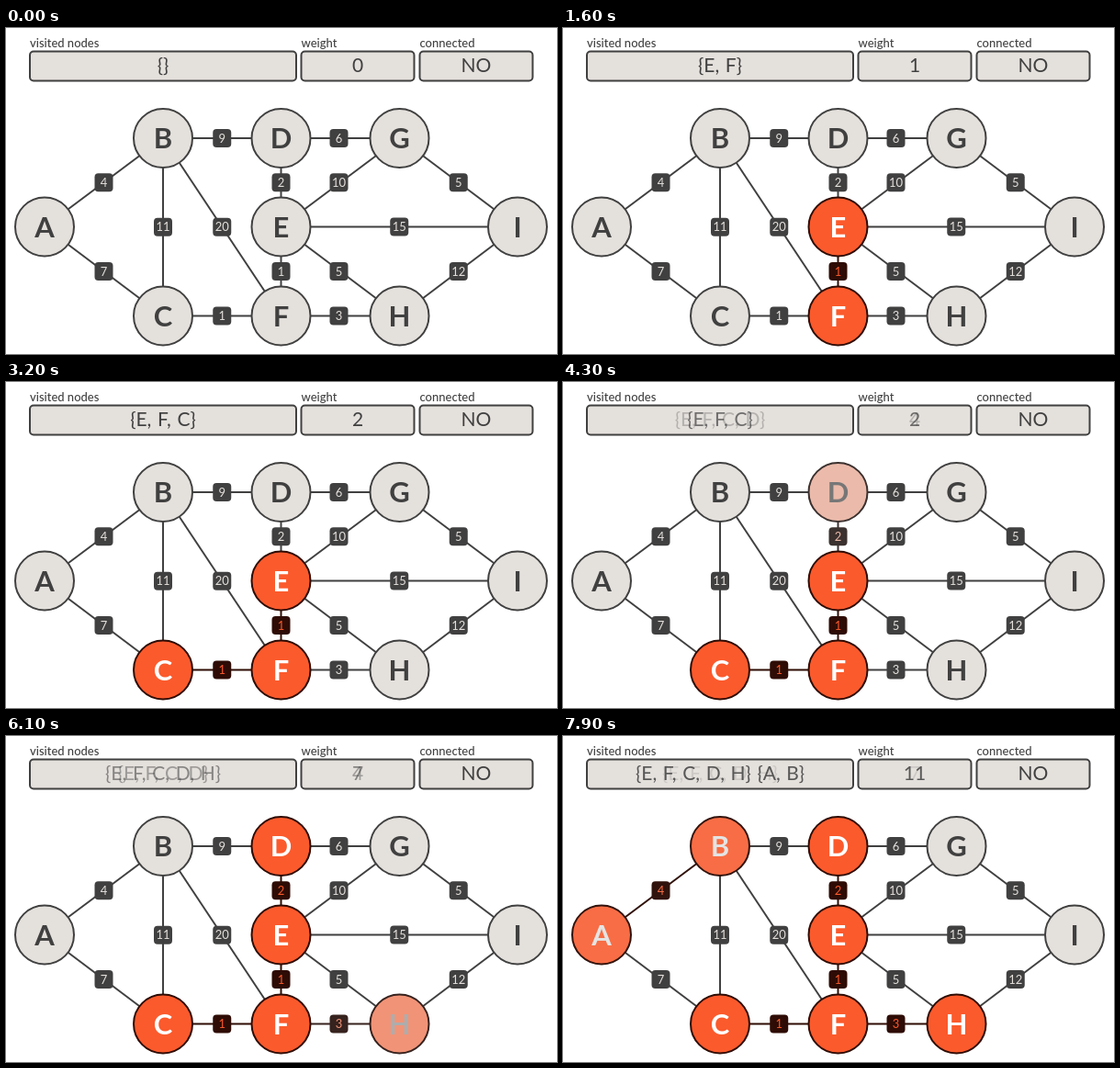
These frames come from a looping animation (600 px wide and 355 px high, 8000 ms). An HTML page with a canvas:

```html
<!DOCTYPE html>
<html lang="en">
<head>
<meta charset="utf-8">
<title>Minimum spanning tree</title>
<style>
  html, body { margin: 0; height: 100%; overflow: hidden; background: #fff; }
  canvas { display: block; }
</style>
</head>
<body>
<canvas id="stage" width="600" height="355"></canvas>
<script>
const ctx = document.getElementById('stage').getContext('2d');
const LOOP = 8000, FIRST = 1000, INTERVAL = 1600, TICK = 100, TICKS = 7;
const DARK = [64, 64, 64], PALE = [228, 224, 220], WHITE = [255, 255, 255];
const ORANGE = [251, 90, 44], BURNT = [46, 12, 5];

const nodes = {
  A: [42, 216.5], B: [171, 120], C: [171, 313.5],
  D: [299.5, 120], E: [299.5, 216.5], F: [299.5, 313.5],
  G: [428.5, 120], H: [428.5, 313.5], I: [557, 216.5]
};

// End nodes, weight and, where needed, a horizontal label offset
const edges = [
  ['AB', 4], ['AC', 7], ['BC', 11], ['BD', 9], ['BF', 20], ['CF', 1],
  ['DE', 2], ['EF', 1], ['DG', 6, -1.5], ['EG', 10, -1.5], ['EH', 5, -1.5],
  ['FH', 3, -1.5], ['EI', 15], ['GI', 5], ['HI', 12]
];

// Each step picks one edge and adds its unvisited ends
const steps = [
  { adds: '', edge: '', visited: '{}', weight: 0 },
  { adds: 'EF', edge: 'EF', visited: '{E, F}', weight: 1 },
  { adds: 'C', edge: 'CF', visited: '{E, F, C}', weight: 2 },
  { adds: 'D', edge: 'DE', visited: '{E, F, C, D}', weight: 4 },
  { adds: 'H', edge: 'FH', visited: '{E, F, C, D, H}', weight: 7 },
  { adds: 'AB', edge: 'AB', visited: '{E, F, C, D, H} {A, B}', weight: 11 }
];

const mix = (a, b, p) => `rgb(${a.map((v, i) => Math.round(v + (b[i] - v) * p))})`;

function progress(step, time) {
  if (step === 0) return 1;
  const start = FIRST + (step - 1) * INTERVAL;
  const ticks = Math.floor((time - start) / TICK) + 1;
  return Math.min(1, Math.max(0, ticks / TICKS));
}

function text(value, x, y, font, color, align = 'center') {
  ctx.font = `${font} Lato, sans-serif`;
  ctx.textAlign = align;
  ctx.fillStyle = color;
  ctx.fillText(value, x, y);
}

function roundBox(x, y, w, h, r, fill) {
  ctx.beginPath();
  ctx.roundRect(x, y, w, h, r);
  ctx.fillStyle = fill;
  ctx.fill();
}

function field(label, x, width, values) {
  const ink = mix(DARK, DARK, 0);
  text(label, x, 20.5, '500 13px', ink, 'left');
  roundBox(x, 25.5, width, 32, 4, mix(PALE, PALE, 0));
  ctx.strokeStyle = ink;
  ctx.stroke();
  ctx.wordSpacing = '1.3px';
  for (const [value, alpha] of values) {
    ctx.globalAlpha = alpha;
    text(value, x + width / 2, 48, '21px', ink);
  }
  ctx.globalAlpha = 1;
  ctx.wordSpacing = '0px';
}

function drawEdge([ends, weight, dx = 0], p) {
  const [x1, y1] = nodes[ends[0]], [x2, y2] = nodes[ends[1]];
  const x = (x1 + x2) / 2 + dx, y = (y1 + y2) / 2;
  const color = mix(DARK, BURNT, p);
  ctx.strokeStyle = color;
  ctx.beginPath();
  ctx.moveTo(x1, y1);
  ctx.lineTo(x2, y2);
  ctx.stroke();
  roundBox(x - 10, y - 10, 20, 20, 4, color);
  text(weight, x, y + 4.5, '13px', mix(PALE, ORANGE, p));
}

function drawNode(name, p) {
  const [x, y] = nodes[name];
  ctx.beginPath();
  ctx.arc(x, y, 32, 0, Math.PI * 2);
  ctx.fillStyle = mix(PALE, ORANGE, p);
  ctx.fill();
  ctx.strokeStyle = mix(DARK, BURNT, p);
  ctx.stroke();
  text(name, x, y + 11, 'bold 31px', mix(DARK, WHITE, p));
}

function draw(time) {
  const done = steps.map((_, i) => progress(i, time));
  const amount = test => {
    const i = steps.findIndex(test);
    return i < 0 ? 0 : done[i];
  };
  const fade = key => steps
    .map((step, i) => [step[key], done[i] * (1 - (done[i + 1] ?? 0))])
    .filter(([, alpha]) => alpha > 0);

  ctx.fillStyle = '#fff';
  ctx.fillRect(0, 0, 600, 355);
  ctx.lineWidth = 2;
  field('visited nodes', 26, 290, fade('visited'));
  field('weight', 321.5, 123, fade('weight'));
  field('connected', 450.5, 123, [['NO', 1]]);
  for (const edge of edges) drawEdge(edge, amount(step => step.edge === edge[0]));
  for (const name in nodes) drawNode(name, amount(step => step.adds.includes(name)));
}

const origin = performance.now();
function frame() {
  draw((performance.now() - origin) % LOOP);
  requestAnimationFrame(frame);
}
frame();
</script>
</body>
</html>
```
